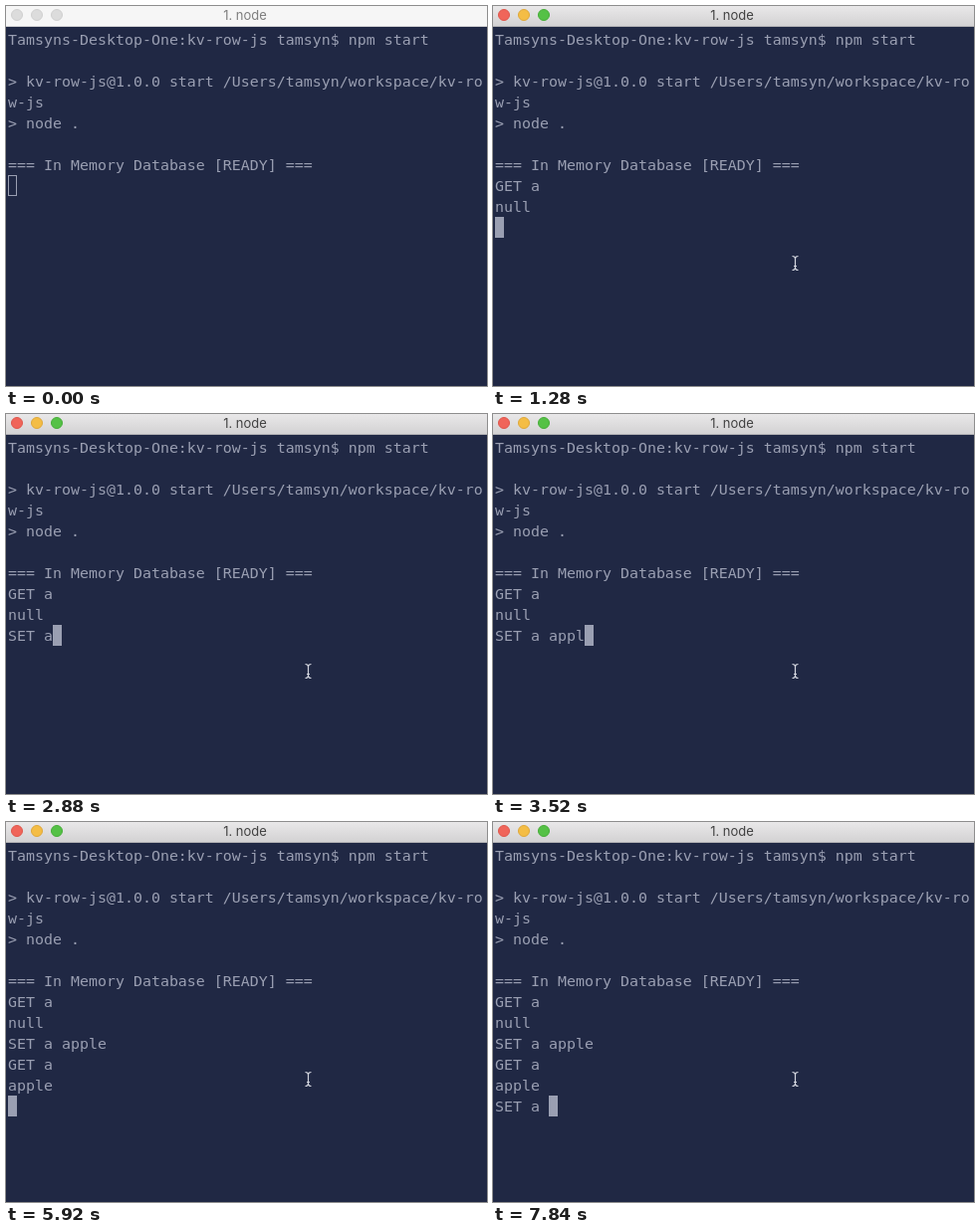
Write an HTML page that moves like this. It is 483 by 382 pixels and loops after 8000 ms.

```html
<!DOCTYPE html>
<html lang="en">
<head>
<meta charset="utf-8">
<title>Terminal</title>
<style>
  html, body { margin: 0; width: 100%; height: 100%; overflow: hidden; background: #202844; }
  #stage { position: relative; width: 483px; height: 382px; overflow: hidden; background: #202844; }
  #bar {
    position: absolute; left: 0; top: 0; width: 483px; height: 20px;
    background: #f6f6f6; border-bottom: 1px solid #d2d2d4;
    color: #7d7d7d; font: 13px/19px Inter, Roboto, sans-serif;
  }
  #bar span { position: absolute; left: 140px; width: 200px; text-align: center; }
  #bar i {
    position: absolute; top: 3px; width: 12px; height: 12px; box-sizing: border-box;
    border-radius: 50%; background: #dcdcdc; border: 1px solid #d0d0d0;
  }
  #bar i:nth-of-type(1) { left: 5px; }
  #bar i:nth-of-type(2) { left: 25px; }
  #bar i:nth-of-type(3) { left: 45px; }
  .active #bar {
    background: linear-gradient(#e9e8e9, #d3d2d3); border-color: #b4b3b6; color: #404040;
  }
  .active #bar i:nth-of-type(1) { background: #f0655a; border-color: #df564c; }
  .active #bar i:nth-of-type(2) { background: #f4bd45; border-color: #dfa83a; }
  .active #bar i:nth-of-type(3) { background: #55c146; border-color: #46ad38; }
  #text {
    position: absolute; left: 2px; top: 24px; margin: 0; white-space: pre; color: #9a9fb2;
    font: 14.95px/21px "DejaVu Sans Mono", "Liberation Mono", monospace;
  }
  #caret {
    position: absolute; left: 2px; top: 23px; width: 9px; height: 21px;
    box-sizing: border-box; border: 1px solid #9a9fb2;
  }
  .active #caret { background: #9a9fb2; }
  #mouse { position: absolute; left: 299px; top: 250px; visibility: hidden; }
  .active #mouse { visibility: visible; }
</style>
</head>
<body>
<div id="stage">
  <div id="bar"><i></i><i></i><i></i><span>1. node</span></div>
  <div id="caret"></div>
  <pre id="text"></pre>
  <svg id="mouse" width="9" height="17" fill="none" stroke="#d3d6df" stroke-width="1.2">
    <path d="M1.5 1.5Q4.5 1.5 4.5 4V13Q4.5 15.5 1.5 15.5M7.5 1.5Q4.5 1.5 4.5 4M4.5 13Q4.5 15.5 7.5 15.5M3 11.5H6"/>
  </svg>
</div>
<script>
const LOOP = 8000, CELL = 9, ROW = 21;
const $ = id => document.getElementById(id);
const stage = $("stage"), text = $("text"), caret = $("caret"), mouse = $("mouse");

const intro = [
  "Tamsyns-Desktop-One:kv-row-js tamsyn$ npm start",
  "",
  "> kv-row-js@1.0.0 start /Users/tamsyn/workspace/kv-ro",
  "w-js",
  "> node .",
  "",
  "=== In Memory Database [READY] ===",
  ""
].join("\n");

// [time in ms, characters added to the session]
const keys = [
  [640, "GE"], [800, "T "], [1120, "a"], [1280, "\nnull\n"],
  [2400, "S"], [2560, "E"], [2720, "T"], [2880, " a"],
  [3040, " "], [3200, "a"], [3360, "pp"], [3520, "l"], [3840, "e"], [4160, "\n"],
  [5280, "G"], [5440, "E"], [5600, "T"], [5760, " a"], [5920, "\napple\n"],
  [7040, "S"], [7200, "E"], [7360, "T"], [7520, " "], [7680, "a"], [7840, " "]
];

function draw(t) {
  const shown = intro + keys.filter(k => k[0] <= t).map(k => k[1]).join("");
  const lines = shown.split("\n");
  const row = lines.length - 1, col = lines[row].length;
  if (text.textContent !== shown) text.textContent = shown;
  caret.style.transform = `translate(${col * CELL}px, ${row * ROW}px)`;
  stage.classList.toggle("active", t >= 160);
  mouse.style.transform = t < 320 ? "translateY(20px)" : "none";
}

const start = performance.now();
function tick() {
  draw((performance.now() - start) % LOOP);
  requestAnimationFrame(tick);
}
tick();
</script>
</body>
</html>
```
